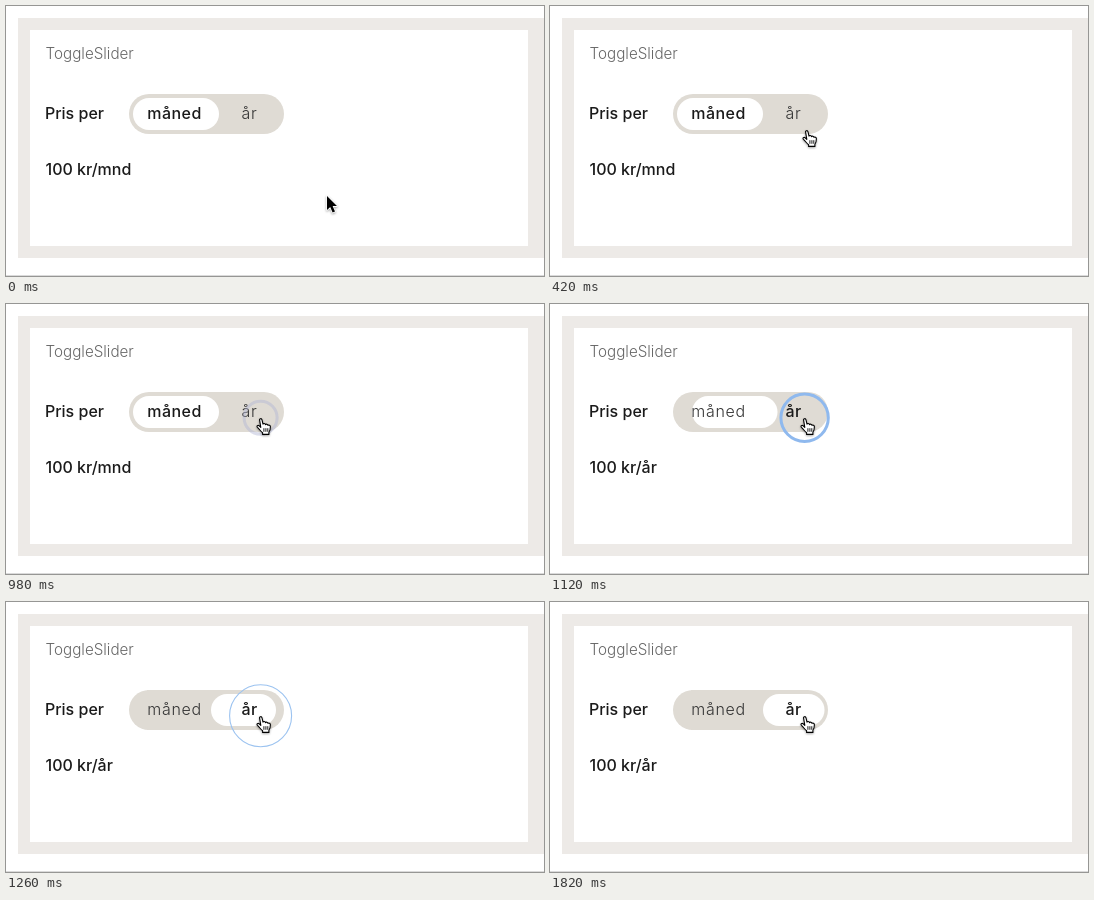
These frames come from a looping animation (538 px wide and 270 px high, 2.38 s). An HTML page:

```html
<!DOCTYPE html>
<html lang="nb">
<head>
<meta charset="utf-8">
<title>ToggleSlider</title>
<style>
  html, body { margin: 0; width: 100%; height: 100%; overflow: hidden; background: #fff; }
  svg { display: block; }
  text { font: 500 16px Inter, Roboto, sans-serif; fill: #1a1a1a; }
  .title { font-size: 15.2px; font-weight: 300; fill: #666; }
  .label { letter-spacing: .45px; }
  .label.off { font-weight: 300; letter-spacing: .7px; fill: #333; }
  .soft { filter: drop-shadow(0 1px 1px rgba(0, 0, 0, .35)); }
</style>
</head>
<body>
<svg width="538" height="270" viewBox="0 0 538 270">
  <rect x="12" y="12" width="526" height="240" fill="#edeae7"/>
  <rect x="24" y="24" width="498" height="216" fill="#fff"/>
  <rect y="269" width="538" height="1" fill="#dadada"/>

  <text class="title" x="39.6" y="53">ToggleSlider</text>
  <text x="39" y="113">Pris per</text>
  <text id="price" x="39.5" y="169"></text>

  <rect x="123" y="88" width="155" height="40" rx="20" fill="#dfdbd4"/>
  <rect id="knob" y="92" height="32" rx="16" fill="#fff"/>
  <text id="month" class="label" x="141.3" y="113">måned</text>
  <text id="year" class="label" x="235.5" y="113">år</text>

  <circle id="ring" cx="254.6" cy="113.7" fill="none"/>

  <g id="arrow" class="soft">
    <path d="M0 0V14L3.2 11L5.6 16.6L8 15.6L5.6 10.1H10Z"
      fill="#000" stroke="#fff" stroke-width="1.6" paint-order="stroke" stroke-linejoin="round"/>
  </g>
  <g id="hand" class="soft" stroke="#000" stroke-width="1.1" stroke-linejoin="round" stroke-linecap="round">
    <path fill="#fff" d="M3.6 2.2C3.3 .4 5.6 .1 6 1.8L7 6.2C7.3 5.2 9.2 5.3 9.5 6.7C10 5.8 11.8 6 12 7.4
      C12.7 6.7 14.4 7.2 14.4 8.8C14.4 11 14 12.6 12.9 14.2V16.4H6.6V14.8C5 13.6 3.4 11.2 1.4 9.3
      C.2 7.9 1.9 6.8 3.2 7.8L4.8 9.3Z"/>
    <path fill="none" stroke-width=".9" d="M7.9 10.6V13.4M9.9 10.6V13.4M11.8 10.6V13.4"/>
  </g>
</svg>
<script>
const LOOP = 2380, STEP = 70, SWITCH = 1050;
const $ = id => document.getElementById(id);

// Rows: time in ms, then values
const arrowPath = [[0, 321, 190], [70, 304, 171], [140, 278, 148], [210, 267, 137], [280, 261, 130]];
const handPath = [[350, 253, 127], [420, 252, 124], [490, 251, 119], [560, 250.3, 116], [630, 250, 114]];
const knobPath = [[0, 127, 86], [1050, 129, 86], [1120, 142, 85.5], [1190, 180, 75],
  [1260, 205, 65], [1330, 211, 62.5], [1400, 213, 61.5]];
// Radius, line width, colour
const rings = [[0, 0, 0, 'none'], [980, 16.5, 3, 'rgba(176,180,210,.45)'], [1050, 20, 4, 'rgba(135,170,225,.8)'],
  [1120, 23.7, 3, '#8fb9ee'], [1190, 27.5, 2, '#92bbee'], [1260, 31, 1.1, '#9cc3f0'],
  [1330, 33, .7, 'rgba(156,195,240,.4)'], [1400, 0, 0, 'none']];

const at = (rows, t) => rows.filter(r => r[0] <= t).pop() || rows[0];

function set(id, attrs) {
  for (const key in attrs) $(id).setAttribute(key, attrs[key]);
}

function place(id, rows, t, shown) {
  const [, x, y] = at(rows, t);
  set(id, { transform: `translate(${x} ${y})`, visibility: shown ? 'visible' : 'hidden' });
}

function draw(t) {
  const pointing = t >= handPath[0][0], yearly = t >= SWITCH;
  place('arrow', arrowPath, t, !pointing);
  place('hand', handPath, t, pointing);

  const [, x, width] = at(knobPath, t);
  set('knob', { x, width });
  const [, r, line, stroke] = at(rings, t);
  set('ring', { r, stroke, 'stroke-width': line });

  $('price').textContent = yearly ? '100 kr/år' : '100 kr/mnd';
  $('month').classList.toggle('off', yearly);
  $('year').classList.toggle('off', !yearly);
}

const start = performance.now();
function tick(now) {
  const t = Math.max(0, now - start) % LOOP;
  draw(Math.floor(t / STEP) * STEP);
  requestAnimationFrame(tick);
}
draw(0);
requestAnimationFrame(tick);
</script>
</body>
</html>
```
